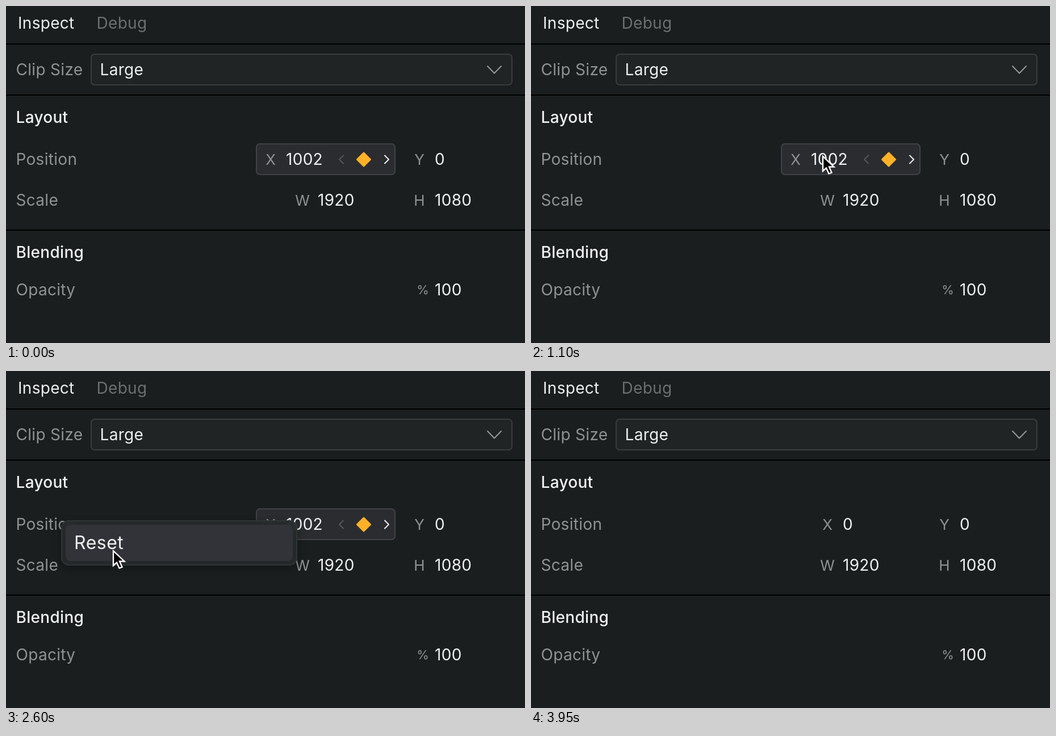
These frames come from a looping animation (914 px wide and 594 px high, 4.25 s). An HTML page:

```html
<!DOCTYPE html>
<html lang="en">
<head>
<meta charset="utf-8">
<title>Inspector reset</title>
<style>
  html, body { margin: 0; width: 100%; height: 100%; overflow: hidden; background: #1a1e1f; }
  #stage { position: relative; width: 914px; height: 594px; overflow: hidden; background: #1a1e1f; }
  svg { position: absolute; inset: 0; display: block; }
  text, #menu { font: 400 28px Inter, sans-serif; letter-spacing: .3px; }
  .title { fill: #f0f2f2; font-weight: 500; }
  .name { fill: #8f9393; }
  .value { fill: #eff1f1; }
  .axis { fill: #8f9393; font-size: 26px; text-anchor: middle; letter-spacing: 0; }
  .rule { fill: #000; }
  .field { fill: #2b2c30; stroke: #414246; stroke-width: 2; }
  .line { fill: none; stroke-width: 2; stroke-linecap: round; stroke-linejoin: round; }
  #menu {
    position: absolute; left: 97px; top: 263px; width: 416px; height: 80px;
    box-sizing: border-box; border: 2px solid #303436; border-radius: 14px;
    background: rgba(38, 42, 43, .94); backdrop-filter: blur(8px);
    box-shadow: 0 4px 14px rgba(0, 0, 0, .3);
  }
  #item {
    position: absolute; left: 6px; top: 6px; width: 400px; height: 64px;
    box-sizing: border-box; padding-left: 15px; border-radius: 8px;
    font-size: 32px; line-height: 64px; letter-spacing: .5px; color: #9a9d9e;
  }
  #item.hover { background: #313339; color: #eff1f1; }
</style>
</head>
<body>
<div id="stage">
  <svg width="914" height="594">
    <text class="value" x="21" y="40">Inspect</text>
    <text x="159.5" y="40" fill="#6b6f70">Debug</text>
    <rect class="rule" y="66" width="914" height="2"/>
    <text class="name" x="17.5" y="122">Clip Size</text>
    <rect x="150" y="85" width="741" height="54" rx="6" fill="#202425" stroke="#393d3e" stroke-width="2"/>
    <text class="value" x="165.5" y="122">Large</text>
    <path class="line" d="M848 106 860 118.500 872 106" stroke="#96999a"/>
    <rect class="rule" y="156" width="914" height="2"/>

    <text class="title" x="17.5" y="206">Layout</text>
    <text class="name" x="17.5" y="280">Position</text>
    <g id="keyed">
      <rect class="field" x="441" y="243" width="244" height="54" rx="6"/>
      <text class="axis" x="466" y="280">X</text>
      <text class="value" x="493" y="280">1002</text>
      <path class="line" d="M594 263.500 587 270.500 594 277.500" stroke="#55575a"/>
      <path d="M630 259 641.500 270.500 630 282 618.500 270.500Z" fill="#fdb128" stroke="#fdb128" stroke-width="3" stroke-linejoin="round"/>
      <path class="line" d="M667 263.500 674 270.500 667 277.500" stroke="#eff1f1"/>
    </g>
    <g id="plain">
      <text class="axis" x="522" y="280">X</text>
      <text class="value" x="549" y="280">0</text>
    </g>
    <text class="axis" x="728" y="280">Y</text>
    <text class="value" x="755" y="280">0</text>

    <text class="name" x="17.5" y="352">Scale</text>
    <g id="scale">
      <rect class="field" x="497" y="315" width="188" height="54" rx="6"/>
      <path class="line" d="M658 330.500 669.500 342 658 353.500 646.500 342Z" stroke="#8d8e91"/>
    </g>
    <text class="axis" x="522" y="352">W</text>
    <text class="value" x="549" y="352">1920</text>
    <text class="axis" x="728" y="352">H</text>
    <text class="value" x="755" y="352">1080</text>
    <rect class="rule" y="394" width="914" height="2"/>

    <text class="title" x="17.5" y="444">Blending</text>
    <text class="name" x="17.5" y="510">Opacity</text>
    <text class="axis" x="734" y="508" style="font-size:22px">%</text>
    <text class="value" x="755" y="510">100</text>
  </svg>

  <div id="menu"><div id="item">Reset</div></div>

  <svg width="914" height="594">
    <circle id="ring" fill="none" stroke="#1e6ee2" stroke-width="5.500"/>
    <path id="cursor" d="M1 3V29L7 23.500 11.500 33.500 16.500 31.500 12 21.500H20.500Z" fill="#000" stroke="#fff" stroke-width="2.400"/>
  </svg>
</div>
<script>
  const LOOP = 4250, STEP = 50;
  const OFF = [400, 690], FIELD = [513, 262], RESET = [188, 314];
  const CLICKS = [[1450, FIELD], [2900, RESET]], RING_TIME = 350;
  const $ = id => document.getElementById(id);
  const [keyed, plain, scale, menu, item, ring, cursor] =
    ['keyed', 'plain', 'scale', 'menu', 'item', 'ring', 'cursor'].map($);

  const clamp = v => Math.min(1, Math.max(0, v));
  const span = (t, a, b) => clamp((t - a) / (b - a));
  const outQuad = p => 1 - (1 - p) ** 2;
  const inOut = p => p < .5 ? 4 * p ** 3 : 1 - 4 * (1 - p) ** 3;
  const mix = (a, b, q) => a.map((v, i) => v + (b[i] - v) * q);
  const show = (el, on) => { el.style.display = on ? '' : 'none'; };

  function cursorAt(t) {
    if (t < 2050) {
      const q = outQuad(span(t, 130, 1100));
      const [x, y] = mix(OFF, FIELD, q);
      return [x + 370 * q ** 3 * (1 - q), y]; // bows right before settling
    }
    if (t < 3550) return mix(FIELD, RESET, inOut(span(t, 2050, 2600)));
    return mix(RESET, OFF, inOut(span(t, 3550, 4190)));
  }

  function draw(t) {
    const [x, y] = cursorAt(t);
    cursor.setAttribute('transform', `translate(${x} ${y})`);

    const menuOpen = t >= 1450 && t < 3030;
    show(menu, menuOpen);
    menu.style.opacity = 1 - span(t, 2930, 3030);
    item.classList.toggle('hover', x < 505 && y > 271);
    show(scale, !menuOpen && x > 496 && x < 686 && y > 314 && y < 370);
    show(keyed, t < 2950);
    show(plain, t >= 2950);

    const click = CLICKS.find(([at]) => t >= at && t < at + RING_TIME);
    show(ring, click);
    if (click) {
      const [at, [cx, cy]] = click, p = (t - at) / RING_TIME;
      ring.setAttribute('cx', cx);
      ring.setAttribute('cy', cy + 1.5);
      ring.setAttribute('r', 12 + 57 * outQuad(p));
      ring.style.opacity = 1 - p;
    }
  }

  const start = performance.now();
  function tick() {
    const t = (performance.now() - start) % LOOP;
    draw(Math.floor(t / STEP) * STEP);
    requestAnimationFrame(tick);
  }
  tick();
</script>
</body>
</html>
```
